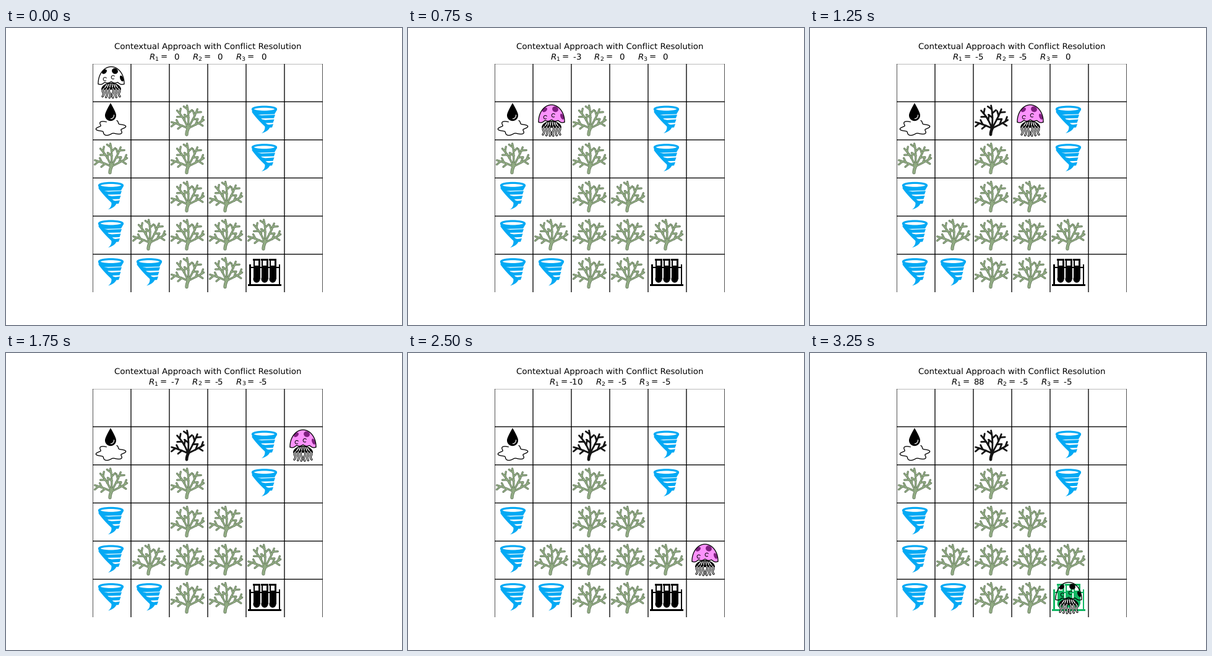
Animation, 640 px wide and 480 px high, one loop 3.5 s. Source, as a matplotlib script:

```python
import numpy as np
import matplotlib.pyplot as plt
from matplotlib.animation import FuncAnimation
from matplotlib.patches import Ellipse, Polygon, Rectangle

plt.rcParams.update({"font.family": "DejaVu Sans", "text.hinting": "none"})
W, H, CELL_W, CELL_H = 640, 480, 62, 61.6
BLUE, GREEN, PINK, PURPLE = "#03a9f4", "#10b662", "#fb92fb", "#7f1f80"

fig = plt.figure(figsize=(8, 6), dpi=80, facecolor="white")
ax = fig.add_axes([140 / W, 0.11, 6 * CELL_W / W, 0.77])

# C coral, X coral that breaks, T tornado, O oil, L laboratory
MAP = ["......",
       "O.X.T.",
       "C.C.T.",
       "T.CC..",
       "TCCCC.",
       "TTCCL."]
MOVES = "D.RRRRRDDDDL."
STEP = {"D": (1, 0), "R": (0, 1), "L": (0, -1), ".": (0, 0)}
ROUTE = np.cumsum([(0, 0)] + [STEP[m] for m in MOVES], axis=0)
LAST = len(MOVES)


def bend(a, b, c):
    """Quadratic curve from a to c, pulled towards b."""
    t = np.linspace(0, 1, 17)[:, None]
    a, b, c = np.array([a, b, c], float)
    return (1 - t) ** 2 * a + 2 * t * (1 - t) * b + t**2 * c


def arc(x, y, rx, ry, start=0.0, stop=2 * np.pi, n=60):
    t = np.linspace(start, stop, n)
    return np.c_[x + rx * np.cos(t), y - ry * np.sin(t)]


class Pen:
    """Draws in pixels from the top left corner of one cell."""

    def __init__(self, cell, z=2, alpha=1):
        self.origin = np.array([cell[1] * CELL_W, cell[0] * CELL_H])
        self.z, self.alpha = z, alpha

    def line(self, points, color="black", width=1.2, z=0):
        x, y = (np.array(points, float) + self.origin).T
        ax.plot(x, y, color=color, lw=width * 0.9, alpha=self.alpha,
                solid_capstyle="round", solid_joinstyle="round", zorder=self.z + z)

    def fill(self, points, color="black", edge="none", width=0, z=0):
        ax.add_patch(Polygon(np.array(points, float) + self.origin, fc=color, ec=edge,
                             lw=width * 0.9, alpha=self.alpha, zorder=self.z + z))

    def oval(self, x, y, w, h, color="black", edge="none", width=0, angle=0, z=0):
        ax.add_patch(Ellipse(self.origin + (x, y), w, h, angle=angle, fc=color, ec=edge,
                             lw=width * 0.9, alpha=self.alpha, zorder=self.z + z))

    def box(self, x, y, w, h, color="black", z=0):
        ax.add_patch(Rectangle(self.origin + (x, y), w, h, fc=color, ec="none",
                               alpha=self.alpha, zorder=self.z + z))


def coral_twigs():
    """Limbs fan out from the trunk; twigs leave them on alternate sides."""
    gap = [(np.nan, np.nan)]
    parts = []
    for i, angle in enumerate(np.radians(np.linspace(168, 18, 5))):
        out = np.array([np.cos(angle), -np.sin(angle)])
        limb = bend((30, 43), (30, 40) + out * (13, 20) + (3, 2), (30, 40) + out * (27, 34))
        parts += [limb, gap]
        for k, at in enumerate((7, 10, 13)):
            turn = angle + 0.9 * (-1) ** (k + i)
            tip = limb[at] + 8 * np.array([np.cos(turn), -np.sin(turn)])
            parts += [[limb[at], tip], gap]
    return np.vstack(parts)


TWIGS = coral_twigs()
TRUNK = bend((28, 53), (28, 48), (31, 42))


def coral(cell, alpha, broken=False):
    pen = Pen(cell, alpha=alpha)
    if broken:
        layers = [("#151515", 2.8)]
    else:
        layers = [("#5c6f55", 3.2), ("#91ab83", 1.9)]
    for z, (color, width) in enumerate(layers):
        pen.line(TWIGS, color, width, z / 10)
        pen.line(TRUNK, color, width + 2, z / 10)


def tornado(cell, alpha):
    pen = Pen(cell, alpha=alpha)
    pen.fill([(9, 13), (14, 21), (46, 20), (50, 13)], BLUE)
    for k in range(3):
        left, right, y = 15 + 6 * k, 47 - 1.5 * k, 24 + 7.5 * k
        pen.fill([(left, y - 4), (left + 10, y - 2), (right, y - 3),
                  (right - 2, y + 2.5), (left + 7, y + 3)], BLUE)
    pen.line(bend((12, 16), (20, 27), (32, 38)), BLUE, 5)
    pen.fill(np.vstack([bend((30, 38), (32, 46), (25, 51)), bend((25, 51), (38, 47), (39, 39))]),
             BLUE)
    pen.oval(29.5, 12, 38, 8, "white", BLUE, 3.2, z=0.1)


def oil(cell, alpha):
    pen = Pen(cell, alpha=alpha)
    round_part = arc(29, 22, 9, 9, np.radians(165), np.radians(375))
    pen.fill(np.vstack([round_part, bend(round_part[-1], (36, 14), (29, 2)),
                        bend((29, 2), (22, 14), round_part[0])]))
    pen.line(arc(29, 22, 5.5, 5.5, -1.5, 0.1), "white", 1.2, 0.1)
    t = np.linspace(1.95, 7.45, 120)
    ripple = 1 + 0.17 * np.sin(6 * t + 0.4)
    pen.line(np.c_[29.5 + 21 * ripple * np.cos(t), 42 - 11 * ripple * np.sin(t)], width=1.3)


def tubes(cell, alpha, color="black"):
    pen = Pen(cell, alpha=alpha)
    pen.box(3, 48.5, 54, 3, color)
    pen.box(6, 20, 48, 2, color)
    for x in (5, 52.5):
        pen.box(x, 16, 2.5, 32.5, color)
    for x in (17, 30, 43):
        pen.oval(x, 40, 11, 12, color, z=0.1)
        pen.box(x - 5.5, 10, 11, 30, color, z=0.1)
        pen.box(x - 6, 7, 12, 3, color, z=0.1)
        pen.box(x - 3, 10, 6, 8, "white", z=0.2)


def jellyfish(cell, loaded):
    pen = Pen(cell, 4)
    spot = PURPLE if loaded else "black"
    x = np.linspace(9, 51, 60)
    hem = 33 + 2 * np.abs(np.sin((x - 9) / 42 * 4 * np.pi)) - 4 * np.sin((x - 9) / 42 * np.pi)
    head = np.vstack([arc(30, 32, 21, 27, 0, np.pi), np.c_[x, hem]])
    if loaded:
        Pen(cell, 1).fill(head, PINK)
    pen.fill(head, "none", "black", 1.3, 0.3)
    for x, y, w, h, angle in ((19, 13, 9, 6, -40), (36, 12, 10, 9, 30), (47, 24, 5, 10, -22)):
        pen.oval(x, y, w, h, spot, angle=angle)
    for x, y in ((20, 25), (33, 22)):
        pen.line(arc(x, y, 2.8, 2.8, 0.6, 5.3), width=1)

    # Striped underside, then arms that hang and sway outwards.
    pen.fill(arc(30, 42, 16, 11, 0, np.pi), "black", z=0.1)
    for side in np.linspace(-1, 1, 6):
        pen.line([(30 + 7 * side, 33 + side**2), (30 + 12 * side, 41)], "white", 1.4, 0.2)
        t = np.linspace(0, 1, 20)
        sway = 1.3 * np.sin(2 * np.pi * t) * np.sign(side)
        arm = np.c_[30 + (12 + 2 * t) * side + sway, 40 + (15 - 2 * side**2) * t]
        pen.line(arm, "black", 3.3, 0.2)
        pen.line(arm, "white", 1.2, 0.25)


def title(step):
    r1 = 100 - (step - 1) if step == LAST else -step
    scores = (r1, -5 if step >= 4 else 0, -5 if step >= 6 else 0)
    row = "     ".join(f"$R_{i}=${v:3d}" for i, v in enumerate(scores, 1))
    ax.set_title("Contextual Approach with Conflict Resolution\n" + row, fontsize=12)


def draw(step):
    ax.clear()
    ax.set_xlim(0, 6 * CELL_W)
    ax.set_ylim(6 * CELL_H, 0)
    ax.axis("off")
    for i in range(7):
        ax.plot([i * CELL_W] * 2, [0, 6 * CELL_H], "k", lw=1.2, zorder=6, snap=False)
    for i in range(6):
        ax.plot([0, 6 * CELL_W], [i * CELL_H] * 2, "k", lw=1.2, zorder=6, snap=False)

    here, loaded = tuple(ROUTE[step]), 2 <= step < LAST
    for cell in np.ndindex(6, 6):
        kind = MAP[cell[0]][cell[1]]
        alpha = 0.5 if loaded and cell == here else 1
        if kind in "CX":
            coral(cell, alpha, kind == "X" and step >= 4)
        elif kind == "T":
            tornado(cell, alpha)
        elif kind == "O":
            oil(cell, alpha)
        elif kind == "L":
            tubes(cell, alpha, GREEN if step == LAST else "black")
    jellyfish(here, loaded)
    title(step)
    return []


anim = FuncAnimation(fig, draw, frames=len(ROUTE), init_func=lambda: [],
                     interval=250, repeat=True, repeat_delay=0)
plt.show()
```
